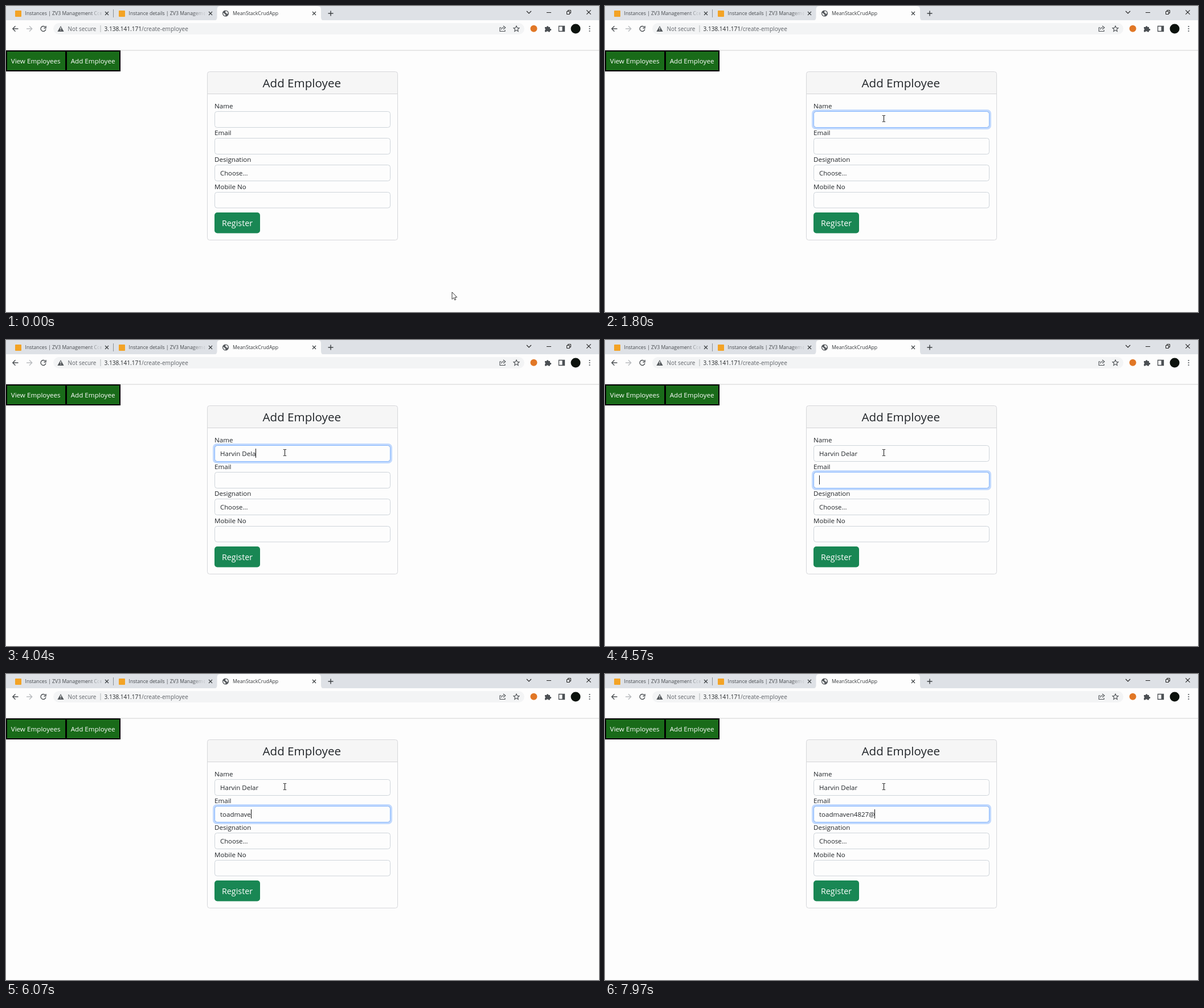
Animation, 1041 px wide and 538 px high, one loop 8000 ms. Source, as an HTML page with a canvas:

```html
<!DOCTYPE html>
<html lang="en">
<head>
<meta charset="utf-8">
<title>Add Employee</title>
<style>
  html, body { margin: 0; width: 100%; height: 100%; overflow: hidden; background: #fdfdfd; }
  canvas { display: block; width: 1041px; height: 538px; }
</style>
</head>
<body>
<canvas id="stage"></canvas>
<script>
const W = 1041, H = 538, LOOP = 8000;
const FONT = '"Open Sans", "Noto Sans", sans-serif';
const PAGE = '#fdfdfd', STRIP = '#dee1e6', INK = '#212529', ICON = '#4c5054', LINE = '#ced4da';

const canvas = document.getElementById('stage');
const ctx = canvas.getContext('2d');
const dpr = window.devicePixelRatio || 1;
canvas.width = W * dpr;
canvas.height = H * dpr;

const INPUT_X = 366, INPUT_W = 309, TEXT_X = 376, TEXT_SIZE = 11.5;

// Each field: top edge, focus span, typed value and the time of each key.
const fields = [
  { label: 'Name', y: 185, h: 29, focus: 955, blur: 4385, value: 'Harvin Delar',
    keys: [1810, 2150, 2240, 2330, 2420, 2680, 2930, 3110, 3480, 3580, 3950, 4190] },
  { label: 'Email', y: 232, h: 29, focus: 4385, blur: Infinity, value: 'toadmaven4827@',
    keys: [5180, 5310, 5400, 5480, 5560, 5640, 5720, 5800, 6075, 6830, 7010, 7260, 7450, 7850] },
  { label: 'Designation', y: 279, h: 29, select: true },
  { label: 'Mobile No', y: 327, h: 28.5 }
];

const clamp = v => Math.max(0, Math.min(1, v));
const ease = v => { v = clamp(v); return v * v * (3 - 2 * v); };

function text(str, x, y, size, color = INK, weight = 400) {
  ctx.font = `${weight} ${size}px ${FONT}`;
  ctx.fillStyle = color;
  ctx.fillText(str, x, y);
}

function rect(x, y, w, h, color) {
  ctx.fillStyle = color;
  ctx.fillRect(x, y, w, h);
}

function box(x, y, w, h, r, fill, stroke) {
  ctx.beginPath();
  ctx.roundRect(x, y, w, h, r);
  if (fill) { ctx.fillStyle = fill; ctx.fill(); }
  if (stroke) { ctx.strokeStyle = stroke; ctx.lineWidth = 1; ctx.stroke(); }
}

function disc(x, y, r, color) {
  ctx.beginPath();
  ctx.arc(x, y, r, 0, Math.PI * 2);
  ctx.fillStyle = color;
  ctx.fill();
}

// Strokes an SVG path placed at x, y.
function icon(x, y, d, color = ICON, width = 1.3, fill) {
  ctx.save();
  ctx.translate(x, y);
  const path = new Path2D(d);
  if (fill) { ctx.fillStyle = fill; ctx.fill(path); }
  if (width) { ctx.strokeStyle = color; ctx.lineWidth = width; ctx.stroke(path); }
  ctx.restore();
}

const CROSS = 'M-3 -3L3 3M3 -3L-3 3';

function fadedTitle(str, x) {
  ctx.save();
  ctx.beginPath();
  ctx.rect(x, 0, 133, 25);
  ctx.clip();
  text(str, x, 16.3, 8.7, '#45494d');
  const fade = ctx.createLinearGradient(x + 112, 0, x + 133, 0);
  fade.addColorStop(0, 'rgba(222,225,230,0)');
  fade.addColorStop(1, STRIP);
  rect(x + 112, 0, 21, 25, fade);
  ctx.restore();
}

function tabs() {
  rect(0, 0, W, 25, STRIP);
  box(16, 8, 11, 11, 1, '#f3a325');
  box(198, 8, 11, 11, 1, '#f3a325');
  fadedTitle('Instances | ZV3 Management Console', 33.5);
  fadedTitle('Instance details | ZV3 Management', 215.5);
  rect(188, 6, 1, 14, '#8b9095');

  icon(0, 0, 'M365 25.5Q370.5 25.5 370.5 20V6Q370.5 0 376.5 0H547Q553 0 553 6V20Q553 25.5 558.5 25.5Z', '', 0, PAGE);
  disc(385.5, 13, 5.6, '#53575b');
  icon(385.5, 13, 'M-4.5 -1Q-2 -.5 -1.5 1L0 2L-.5 4.5Q-4.4 3.5 -4.5 -1ZM0 -4.5Q3.5 -4 4.4 -.5L2.5 1.5L1.5 -.5L-.5 -1.2Z', '', 0, '#f4f4f4');
  text('MeanStackCrudApp', 398, 16.3, 8.7, '#35383b');

  for (const x of [177, 359, 541]) icon(x, 13, CROSS, '#3c4043', 1.2);
  icon(570, 13, 'M-4.5 0H4.5M0 -4.5V4.5', '#3c4043', 1.4);
  icon(918, 11, 'M-4 -2L0 2L4 -2', '#222', 1.1);
  icon(953, 11.5, 'M-4 0H4', '#222', 1);
  icon(988, 11, 'M-3.5 -1.5H1.5V3.5H-3.5ZM-1.5 -1.5V-3.5H3.5V1.5H1.5', '#222', 1);
  icon(1023, 11, 'M-3.7 -3.7L3.7 3.7M3.7 -3.7L-3.7 3.7', '#222', 1.1);
}

function toolbar() {
  rect(0, 25, W, 28, PAGE);
  icon(16.5, 40, 'M5 0H-4.5M0 -4.7L-4.7 0L0 4.7', ICON, 1.4);
  icon(41, 40, 'M-5 0H4.5M0 -4.7L4.7 0L0 4.7', '#b9bcbf', 1.4);
  icon(65.5, 40, 'M3.3 -3.1A4.5 4.5 0 1 0 4.4 1M4.6 -5V-1.3H.9', ICON, 1.4);

  box(83, 30, 827, 20, 10, '#f3f4f5');
  icon(96, 40, 'M0 -5L5.6 5H-5.6Z', '', 0, '#54585c');
  rect(95.4, 37.5, 1.2, 3.5, '#fff');
  rect(95.4, 42, 1.2, 1.2, '#fff');
  text('Not secure', 108.5, 43.6, 9.9, '#5f6368');
  rect(165.5, 34, 1, 12, '#b4b7ba');
  const host = '3.138.141.171';
  text(host, 172.5, 43.6, 10.05, '#26292c');
  text('/create-employee', 172.5 + ctx.measureText(host).width, 43.6, 10.05, '#5f6368');

  icon(872, 40, 'M-2.5 -2H-5V4.5H4V2M-2.5 1.5Q-2 -2 2 -2.2M1 -5L4.8 -2L1 1', ICON, 1.1);
  icon(896, 40, 'M0 -5L1.5 -1.7L5 -1.4L2.4 1L3.2 4.5L0 2.6L-3.2 4.5L-2.4 1L-5 -1.4L-1.5 -1.7Z', ICON, 1.1);
  disc(926.5, 39.7, 6, '#e17726');
  icon(951, 40, 'M-5 -3H-2A1.7 1.7 0 1 1 1.4 -3H4V0A1.7 1.7 0 1 1 4 3.2V5.5H1A1.7 1.7 0 0 0 -2.2 5.5H-5V2.6A1.7 1.7 0 0 0 -5 -.4Z', '', 0, ICON);
  icon(975.5, 40, 'M-5 -4.5H5V4.5H-5Z', ICON, 1.3);
  rect(976.5, 35.5, 4, 9, ICON);
  disc(1000, 40, 8.5, '#0c120d');
  for (const y of [36, 40, 44]) disc(1024.5, y, 1.1, ICON);
}

function navButton(x, w, label) {
  rect(x, 78, w, 37, '#000');
  rect(x + 2, 80, w - 4, 33, '#196b19');
  text(label, x + 8.7, 101, 11.65, '#fff');
}

function focusLevel(f, t) {
  if (f.focus === undefined) return 0;
  return ease((t - f.focus) / 150) * (1 - ease((t - f.blur) / 150));
}

function field(f, t) {
  text(f.label, INPUT_X, f.y - 4.6, 11.6);
  const level = focusLevel(f, t);
  if (level > 0) {
    const s = 3 * level;
    box(INPUT_X - s, f.y - s, INPUT_W + 2 * s, f.h + 2 * s, 4 + s, `rgba(13,110,253,${0.25 * level})`);
  }
  const x = INPUT_X + 0.5, y = f.y + 0.5, w = INPUT_W - 1, h = f.h - 1;
  box(x, y, w, h, 4, PAGE, LINE);
  if (level > 0) box(x, y, w, h, 4, null, `rgba(134,183,254,${level})`);

  if (f.select) text('Choose...', TEXT_X, f.y + 19, 11.3);
  if (!f.keys) return;

  const pressed = f.keys.filter(k => k <= t);
  const typed = f.value.slice(0, pressed.length);
  text(typed, TEXT_X, f.y + 18.8, TEXT_SIZE);

  // The caret restarts its blink at every key.
  const since = t - Math.max(f.focus, ...pressed);
  if (t >= f.focus && t < f.blur && since % 1000 < 500) {
    const end = Math.round(TEXT_X + ctx.measureText(typed).width);
    rect(end, f.y + 6, 1, 16, '#111');
  }
}

function page(t) {
  rect(0, 53, W, H - 53, PAGE);
  rect(0, 77.5, W, 1, '#d2d2d2');
  navButton(0, 106, 'View Employees');
  navButton(105, 96, 'Add Employee');

  box(353.5, 115.5, 334, 296, 4, PAGE);
  box(353.5, 115.5, 334, 39, [4, 4, 0, 0], '#f6f6f6');
  rect(354, 154, 333, 1, '#d4d4d6');
  box(353.5, 115.5, 334, 296, 4, null, '#d6d7da');
  text('Add Employee', 450.5, 143, 20.6, INK, 500);

  for (const f of fields) field(f, t);

  box(366, 363, 80, 36.5, 5, '#198754');
  text('Register', 379, 387, 14.3, '#fff');
}

function pointer(t) {
  const p = ease((t - 70) / 730);
  const x = Math.round(783 + (490 - 783) * p);
  const y = Math.round(503 + (198 - 503) * p);
  const overText = fields.some(f => !f.select &&
    x >= INPUT_X && x <= INPUT_X + INPUT_W && y >= f.y && y <= f.y + f.h);
  if (overText) {
    icon(x - 0.5, y, 'M-2.5 -5.5H-.7L0 -5L.7 -5.5H2.5M0 -5V5M-2.5 5.5H-.7L0 5L.7 5.5H2.5', '#111', 1);
  } else {
    icon(x, y, 'M0 0V12.5L2.9 9.8L4.8 14L6.7 13.2L4.9 9.1H8.7Z', '#222', 0.9, '#fff');
  }
}

function draw(now) {
  const t = now % LOOP;
  ctx.setTransform(dpr, 0, 0, dpr, 0, 0);
  page(t);
  toolbar();
  tabs();
  pointer(t);
}

let start;
function tick(now) {
  start ??= now;
  draw(now - start);
  requestAnimationFrame(tick);
}
draw(0);
requestAnimationFrame(tick);
</script>
</body>
</html>
```
